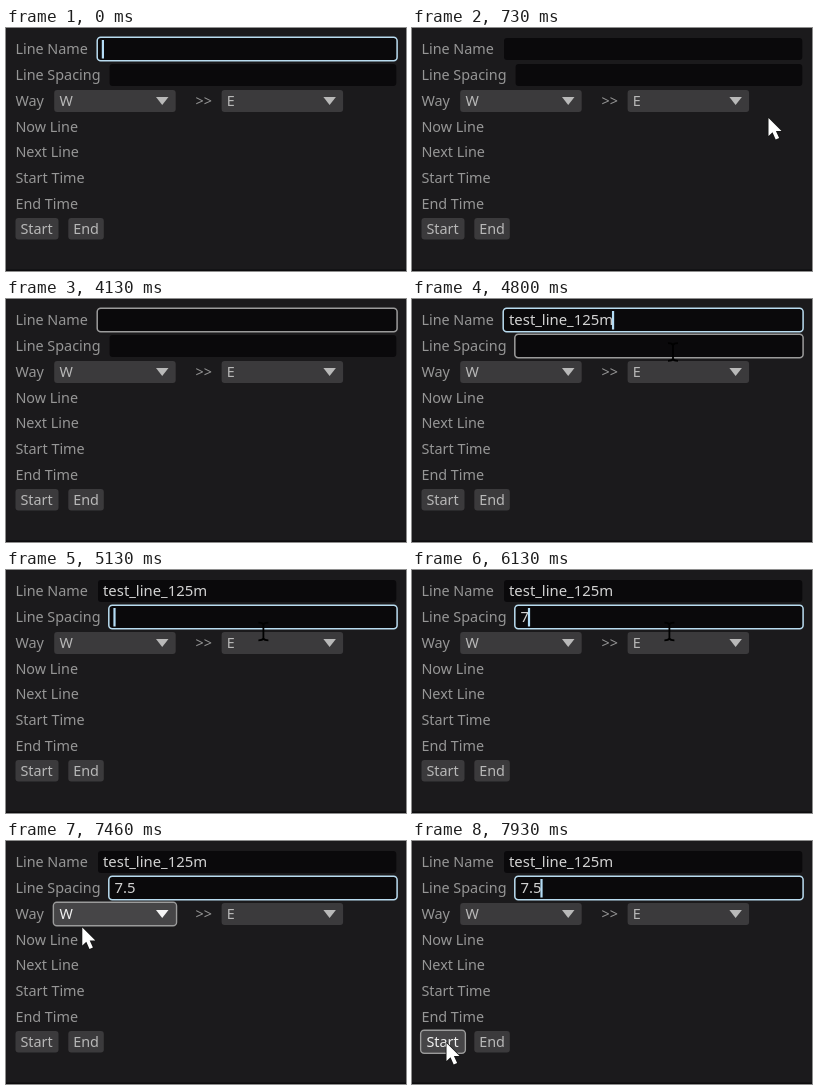
An HTML page with a canvas that plays this animation: 400x243 px, repeating every 8 s.

```html
<!DOCTYPE html>
<html lang="en">
<head>
<meta charset="utf-8">
<title>Line form</title>
<style>
html, body { margin: 0; width: 100%; height: 100%; overflow: hidden; background: #1b1a1c; }
canvas { display: block; width: 100vw; height: 100vh; }
</style>
</head>
<body>
<canvas id="stage"></canvas>
<script>
const W = 400, H = 243, LOOP = 8000;
const canvas = document.getElementById('stage');
const ctx = canvas.getContext('2d');
const FAMILY = '"Noto Sans", "Open Sans", sans-serif';
const LABEL = '#969696', INPUT = '#d2d2d2', WIDGET = '#b8b8b8';
const FOCUS = '#b9dcf0', HOVER = '#9b9b9b';

const setFont = size => { ctx.font = `300 ${size}px ${FAMILY}`; };

// One type size for the whole form, from the width of a label.
setFont(100);
const SIZE = 85.2 / ctx.measureText('Line Spacing').width * 100;

function text(str, x, mid, color, size = SIZE) {
  setFont(size);
  ctx.fillStyle = color;
  ctx.fillText(str, x, mid + 5);
  return x + ctx.measureText(str).width;
}

function box(x, y, w, h, fill, ring) {
  ctx.beginPath();
  ctx.roundRect(x, y, w, h, 3);
  ctx.fillStyle = fill;
  ctx.fill();
  if (!ring) return;
  ctx.beginPath();
  ctx.roundRect(x - 0.8, y - 0.8, w + 1.6, h + 1.6, 3.5);
  ctx.strokeStyle = ring;
  ctx.lineWidth = 1.5;
  ctx.stroke();
}

function field(x, y, state) {
  const ring = state.focus ? FOCUS : state.hover ? HOVER : null;
  box(x, y, 390.3 - x, 22, '#0a090b', ring);
  const end = text(state.value, x + 5, y + 11, INPUT, SIZE * 1.035);
  if (state.caret) {
    ctx.fillStyle = '#b4dcf5';
    ctx.fillRect(end - 1.2, y + 2, 2.2, 18.5);
  }
}

function dropdown(x, value, hot) {
  box(x, 62, 121.5, 22, hot ? '#464547' : '#3b3a3c', hot && HOVER);
  text(value, x + 5.2, 73, hot ? '#f0f0f0' : WIDGET);
  ctx.fillStyle = hot ? '#f5f5f5' : '#b9b9b9';
  ctx.beginPath();
  ctx.moveTo(x + 101.8, 69);
  ctx.lineTo(x + 114.3, 69);
  ctx.lineTo(x + 108, 77);
  ctx.fill();
}

function button(label, x, w, hot) {
  box(x, 190, w, 21.5, hot ? '#464547' : '#3b3a3c', hot && HOVER);
  text(label, x + 4.9, 201, hot ? '#f0f0f0' : WIDGET);
}

function arrow(x, y) {
  ctx.beginPath();
  [[0, 0], [0, 18], [4, 14.2], [7.2, 21.5], [10.6, 20], [7.4, 13], [13, 13]]
    .forEach(([dx, dy]) => ctx.lineTo(x + dx, y + dy));
  ctx.closePath();
  ctx.lineJoin = 'round';
  ctx.lineWidth = 1.6;
  ctx.strokeStyle = '#161616';
  ctx.stroke();
  ctx.fillStyle = '#fff';
  ctx.fill();
}

function beam(x, y) {
  ctx.strokeStyle = '#000';
  ctx.lineWidth = 1.8;
  ctx.beginPath();
  ctx.moveTo(x, y - 8);
  ctx.lineTo(x, y + 8);
  for (const s of [-1, 1]) {
    ctx.moveTo(x - 5, y + s * 8.8);
    ctx.quadraticCurveTo(x - 1, y + s * 8.8, x, y + s * 7);
    ctx.quadraticCurveTo(x + 1, y + s * 8.8, x + 5, y + s * 8.8);
  }
  ctx.stroke();
}

const POINTER = [
  { from: 400, to: 600, path: [350, 62, 356.5, 90], draw: arrow },
  { from: 600, to: 3460, path: [356.5, 90, 356.5, 90], draw: arrow },
  { from: 3460, to: 3530, path: [337, 62, 337, 62], draw: beam },
  { from: 4600, to: 4800, path: [264, 24, 261, 53], draw: beam },
  { from: 4800, to: 5130, path: [261, 53, 257.4, 61.5], draw: beam },
  { from: 5130, to: 7460, path: [257.4, 61.5, 257.4, 61.5], draw: beam },
  { from: 7460, to: 7930, path: [76.3, 86.5, 34.5, 202], draw: arrow },
  { from: 7930, to: LOOP, path: [34.5, 202, 34.5, 202], draw: arrow }
];

const during = (t, a, b) => t >= a && t < b;

function pointer(t) {
  const leg = POINTER.find(p => during(t, p.from, p.to));
  if (!leg) return null;
  const [x0, y0, x1, y1] = leg.path;
  const k = (t - leg.from) / (leg.to - leg.from);
  const e = k * k * (3 - 2 * k);
  return { x: x0 + (x1 - x0) * e, y: y0 + (y1 - y0) * e, draw: leg.draw };
}

function render(t) {
  const p = pointer(t);
  const over = (x, y, w, h) => !!p && p.x >= x && p.x < x + w && p.y >= y && p.y < y + h;
  ctx.fillStyle = '#1b1a1c';
  ctx.fillRect(0, 0, W, H);
  ctx.fillStyle = '#0d0c0e';
  ctx.fillRect(0, 241.5, W, 1.5);

  ['Line Name', 'Line Spacing', 'Way', 'Now Line', 'Next Line', 'Start Time', 'End Time']
    .forEach((label, i) => text(label, 9.4, 21.45 + i * 25.75, LABEL));

  const nameFocus = t < 730 || during(t, 4330, 5060);
  field(92, 10, {
    value: t >= 4530 ? 'test_line_125m' : '',
    focus: nameFocus,
    caret: nameFocus,
    hover: during(t, 3860, 4330)
  });
  field(103.6, 36, {
    value: '7.5'.slice(0, (t >= 6060) + (t >= 6460) + (t >= 6730)),
    focus: t >= 5060,
    caret: during(t, 5060, 5730) || during(t, 6060, 7260) || t >= 7730,
    hover: during(t, 4730, 5060)
  });

  // Only the arrow lights up a dropdown, with a little slack below it.
  dropdown(48.2, 'W', !!p && p.draw === arrow && over(48, 62, 122, 26));
  text('>>', 189.5, 73, LABEL);
  dropdown(215.6, 'E', false);
  button('Start', 9.5, 43, over(9, 190, 44, 22));
  button('End', 62.3, 35.5, false);
  if (p) p.draw(p.x, p.y);
}

function resize() {
  const ratio = window.devicePixelRatio || 1;
  canvas.width = Math.round(innerWidth * ratio);
  canvas.height = Math.round(innerHeight * ratio);
  ctx.setTransform(canvas.width / W, 0, 0, canvas.height / H, 0, 0);
}
addEventListener('resize', resize);
resize();

const start = performance.now();
function frame() {
  render((performance.now() - start) % LOOP);
  requestAnimationFrame(frame);
}
frame();
</script>
</body>
</html>
```
